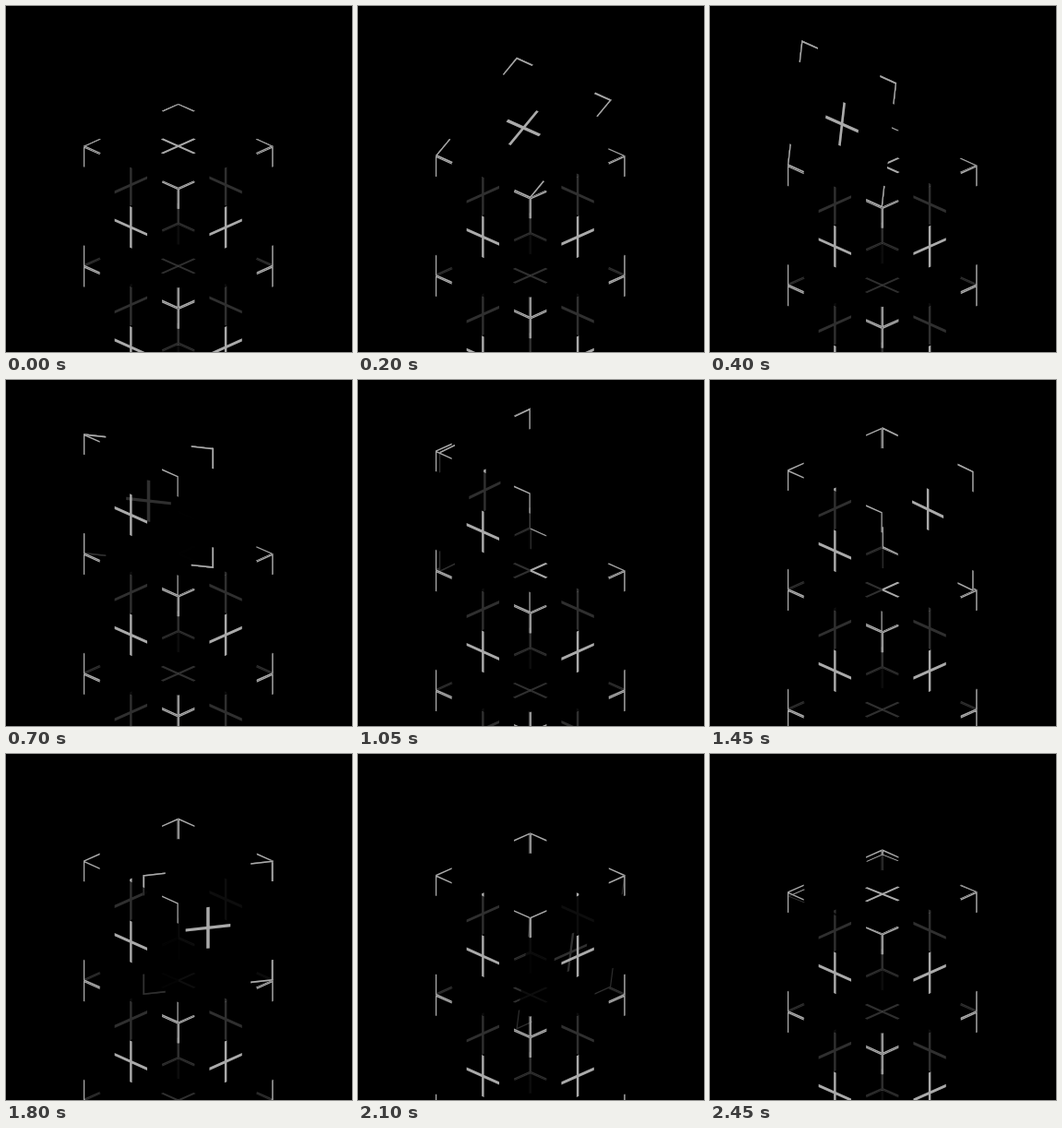
Animation of 375 by 375 pixels, one loop 2500 ms. Source, as an HTML page:

```html
<!DOCTYPE html>
<html lang="en">
<head>
<meta charset="utf-8">
<title>Unfolding cube tower</title>
<style>
  html, body { margin: 0; width: 100%; height: 100%; overflow: hidden; background: #000; }
  svg { display: block; width: 100%; height: 100%; }
</style>
</head>
<body>
<svg id="stage" viewBox="0 0 375 375">
  <defs>
    <g id="panel">
      <path id="face" fill="#000" fill-opacity=".72"/>
      <path id="marks" fill="#aaa"/>
    </g>
  </defs>
</svg>
<script>
const SIDE = 145.3, TICK = 25, LINE = 3.5;
const LOOP = 2500, STEP = 500, FRAME = 50;
const LEFT = 84, BASE = 151.9;
const SIN = Math.sqrt(0.2), COS = Math.sqrt(0.8);   // camera elevation
const RISE = SIDE * COS;
const CUBES = 4;
const ORDER = [1, 2, 4, 3, 0];                      // back to front

const stage = document.getElementById('stage');
const rad = deg => deg * Math.PI / 180;
const ease = u => (1 - Math.cos(Math.PI * u)) / 2;
const ground = deg => [Math.cos(rad(deg)), SIN * Math.sin(rad(deg))];
const up = [0, -COS];
const mix = (a, m, b, n) => [a[0] * m + b[0] * n, a[1] * m + b[1] * n];
const along = (p, dir) => mix(p, 1, dir, SIDE);
const box = (x, y, w, h) => `M${x} ${y}h${w}v${h}h${-w}z`;

// Corner brackets and a centre cross on one square panel
function marks() {
  const half = LINE / 2, mid = SIDE / 2;
  let d = box(mid - TICK, mid - half, 2 * TICK, LINE) +
          box(mid - half, mid - TICK, LINE, 2 * TICK);
  for (const far of [0, 1]) {
    for (const low of [0, 1]) {
      d += box(far * (SIDE - TICK), low * (SIDE - half), TICK, half);
      d += box(far * (SIDE - half), low * (SIDE - TICK), half, TICK);
    }
  }
  return d;
}

// Hinge corner and two edge directions of panel k, opened by p
function pose(k, p, y) {
  const left = [LEFT, y];
  const back = along(left, ground(-45));
  const right = along(back, ground(45));
  const turn = 90 * p, c = Math.cos(rad(turn)), s = Math.sin(rad(turn));
  switch (k) {
    case 0: return [left, ground(45), mix(ground(-45), c, up, s)];
    case 1: return [left, ground(45 - turn), up];
    case 2: return [back, ground(135 - turn), up];
    case 3: return [right, ground(225 - turn), up];
    default: return [along(right, up), ground(135), mix(ground(225), s, up, -c)];
  }
}

function place(el, [o, a, b]) {
  const m = [...a, ...b, ...o].map(v => v.toFixed(4));
  el.setAttribute('transform', `matrix(${m.join(' ')})`);
}

function addPanel() {
  const el = document.createElementNS('http://www.w3.org/2000/svg', 'use');
  el.setAttribute('href', '#panel');
  return stage.appendChild(el);
}

document.getElementById('face').setAttribute('d', box(0, 0, SIDE, SIDE));
document.getElementById('marks').setAttribute('d', marks());
const panels = [];
for (let level = CUBES - 1; level >= 0; level--) {
  for (const side of ORDER) panels.push({ el: addPanel(), level, side });
}

function draw(time) {
  const t = time % LOOP;
  const phase = Math.floor(t / STEP);
  const open = ease(t % STEP / STEP);
  const base = BASE + RISE * t / LOOP;
  for (const { el, level, side } of panels) {
    const k = level ? side : Math.min(side, phase);
    const p = level || k < phase ? 1 : open;
    place(el, pose(k, p, base + level * RISE));
  }
}

const start = performance.now();
function tick() {
  const t = performance.now() - start;
  draw(Math.floor((t + 5) / FRAME) * FRAME);
  requestAnimationFrame(tick);
}
tick();
</script>
</body>
</html>
```
